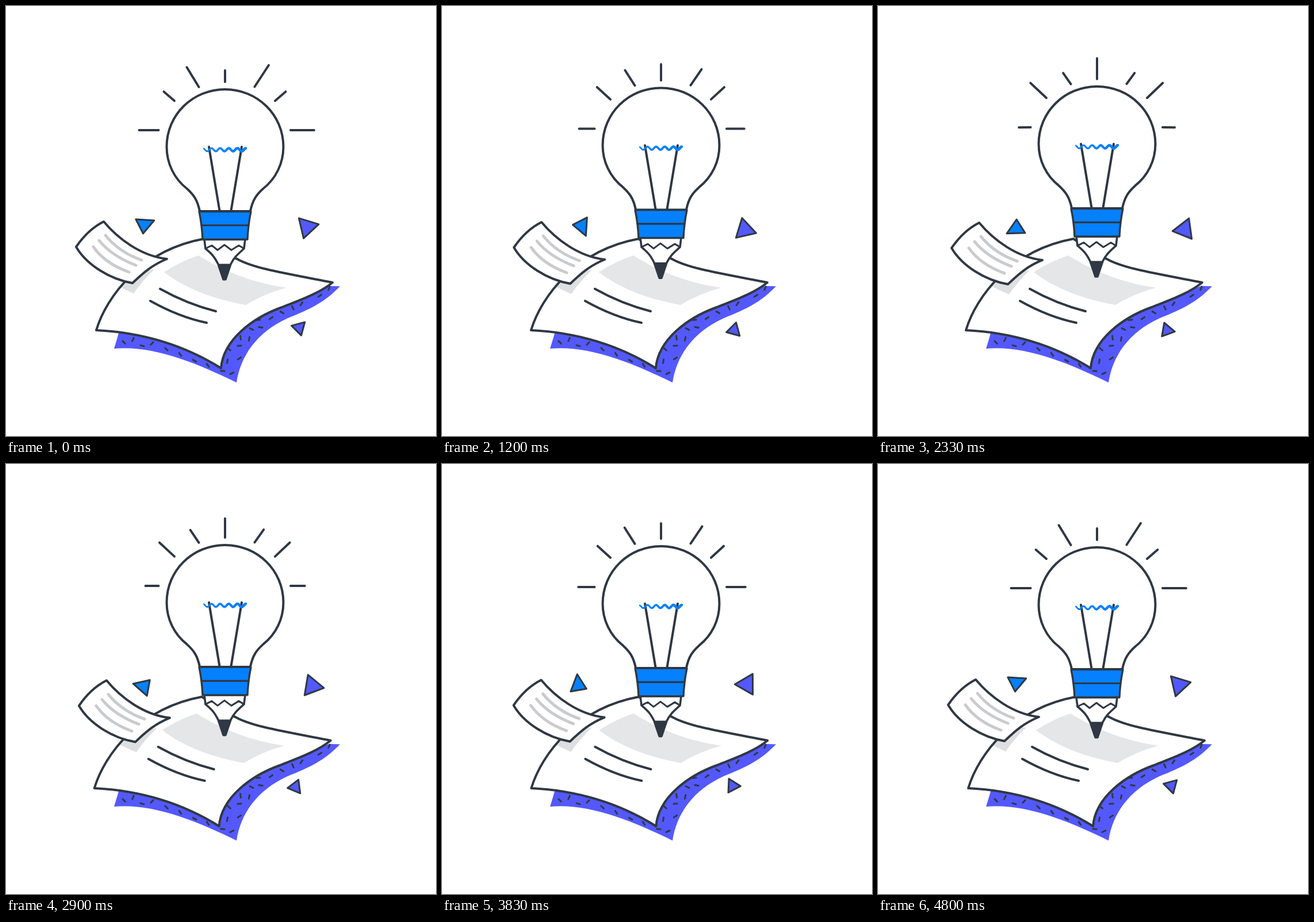
These frames come from a looping animation (748x748 px, 4.83 s). An HTML page with a canvas:

```html
<!DOCTYPE html>
<html lang="en">
<head>
<meta charset="utf-8">
<title>Bright idea</title>
<style>
  html, body { margin: 0; width: 100%; height: 100%; overflow: hidden; background: #fff; }
  canvas { display: block; }
</style>
</head>
<body>
<canvas id="stage" width="748" height="748"></canvas>
<script>
const ctx = document.getElementById('stage').getContext('2d');
const LOOP = 4830, CYCLE = 4800;
const INK = '#2f3843', BLUE = '#0580ff', VIOLET = '#5459ff', PALE = '#e5e6e8', GREY = '#cacbcd', WHITE = '#fff';

const SHADOW = new Path2D('M197 566 L188 596 C255 590 330 620 401 655 C408 610 435 568 490 543 C530 527 555 515 581 487.500 L562 487 L380 560 Z');
const PAPER = new Path2D('M157 564 C175 505 235 425 344 405 C360 415 380 432 402 440 C430 456 480 464 568 481 C545 500 510 512 480 524 C430 542 378 580 374 630 C310 590 240 568 157 564 Z');
const PANEL = new Path2D('M275 463 Q304 444 335 434 C380 462 430 482 488 490 Q450 500 417 520 C360 510 310 490 275 463 Z');
const PAPER_LINES = new Path2D('M268 492 C300 510 330 522 365 531 M251 513 C285 532 315 544 349 551');
const NOTE = new Path2D('M170 375 C195 405 235 435 280 440 C255 450 240 463 220 482 C180 475 140 450 122 419 C135 400 150 385 170 375 Z');
const NOTE_LINES = new Path2D('M173 399 C190 420 210 433 236 442 M162 408 C180 430 205 443 226 451 M152 419 C168 442 192 455 214 463');
const NOTE_SHADE = new Path2D('M185 480 L196 488 L222 500 Q237 478 258 458 L200 465 Z');
const BULB = new Path2D('M337 357 C333 337 326 328 315 318 C292 300 279.500 273 279.500 245 C279.500 189 325 145 381 145 C437 145 482.500 189 482.500 245 C482.500 273 470 300 447 318 C436 328 429 337 425 357 Z');
const WIRES = new Path2D('M353 245 L371.500 356 M410 245 L391.500 356');
const BAND = new Path2D('M336 357.500 L426 357.500 Q421 382 420 406 L342 406 Q341 382 336 357.500 Z');
const BAND_LINE = new Path2D('M340 381.500 L422 381.500');
const PENCIL = new Path2D('M345 406 L347 422 C359 432 363 437 369 449 L378 475 L382 475 L391 449 C397 437 402 433 414 422 L416 406 Z');
const ZIGZAG = new Path2D('M347 422 L358 416.500 L368 424.500 L380 415.500 L392 424.500 L405 416.500 L414 422');
const TIP = new Path2D('M369.500 450 L390.500 450 L382 476 L378 476 Z');

// x, y, angle in degrees
const DASHES = [
  [205, 585, 45], [221, 580, -65], [237, 591, 15], [254, 587, -45], [279, 597, 45], [303, 606, 55],
  [328, 617, 30], [351, 625, 55], [377, 635, 3], [393, 639, -25], [385, 618, -80], [388, 597, 40],
  [406, 613, -32], [406, 591, -3], [408, 577, 82], [423, 579, -78], [427, 562, 25], [443, 559, 8],
  [439, 546, -5], [461, 543, -35], [480, 533, 30], [499, 525, 65], [514, 518, -55], [546, 504, -32], [562, 491, -68]
];

// inner end, outer end at rest, outer end at the top of the rise
const RAYS = [
  [381, 132, 381, 112, 381, 90.3],
  [293, 165, 274.5, 149, 265, 133.5],
  [468, 165, 486.5, 149, 495.5, 133.5],
  [335.5, 141, 314.5, 106.5, 322.3, 117],
  [432.500, 140.500, 457, 103, 446, 117],
  [265.5, 216, 231.5, 216, 245.5, 211],
  [495, 216, 536, 216, 515.5, 211]
];

const equilateral = s => [[-s / 2, -s * 0.2887], [s / 2, -s * 0.2887], [0, s * 0.5774]];
const TIMES = [0, 730, 1670, 2330, 3430, 4230];
const TRIANGLES = [
  { color: BLUE, points: [[-15.4, -8], [16.6, -8], [-1.2, 16]], start: 3.5, turn: 1,
    xs: [240.7, 241, 245, 240.3, 238, 236.3], ys: [380, 381, 384.7, 387.3, 386, 382] },
  { color: VIOLET, points: equilateral(36), start: 17, turn: -1,
    xs: [523.7, 526.7, 527, 533, 531, 528.7], ys: [384.3, 387, 390.3, 388.7, 384, 383] },
  { color: VIOLET, points: equilateral(24), start: -15, turn: 1,
    xs: [510, 507.3, 508.3, 502.7, 505, 506.3], ys: [559.7, 563, 564.3, 564, 560, 560] }
];

const mix = (a, b, k) => a + (b - a) * k;

// Smooth closed curve through values at TIMES
function closedCurve(values, t) {
  const n = TIMES.length;
  const wrap = i => (i + n) % n;
  const time = i => TIMES[wrap(i)] + CYCLE * Math.floor(i / n);
  const value = i => values[wrap(i)];
  const slope = i => (value(i + 1) - value(i - 1)) / (time(i + 1) - time(i - 1));
  let i = n - 1;
  while (i > 0 && TIMES[i] > t) i--;
  const span = time(i + 1) - time(i), u = (t - time(i)) / span, v = 1 - u;
  return v * v * (1 + 2 * u) * value(i) + u * u * (3 - 2 * u) * value(i + 1)
    + span * u * v * (v * slope(i) - u * slope(i + 1));
}

function fill(path, color) {
  ctx.fillStyle = color;
  ctx.fill(path);
}

function stroke(path, width, color = INK) {
  ctx.strokeStyle = color;
  ctx.lineWidth = width;
  ctx.stroke(path);
}

function shifted(dx, dy, draw) {
  ctx.save();
  ctx.translate(dx, dy);
  draw();
  ctx.restore();
}

function line(x1, y1, x2, y2, width, color) {
  const path = new Path2D();
  path.moveTo(x1, y1);
  path.lineTo(x2, y2);
  stroke(path, width, color);
}

function drawShadow() {
  fill(SHADOW, VIOLET);
  for (const [x, y, angle] of DASHES) {
    const a = angle * Math.PI / 180, dx = 3.2 * Math.cos(a), dy = 3.2 * Math.sin(a);
    line(x - dx, y - dy, x + dx, y + dy, 3);
  }
}

function drawPaper(p) {
  shifted(-4.2 * p, 0, () => {
    fill(PAPER, WHITE);
    fill(PANEL, PALE);
    ctx.save();
    ctx.clip(PAPER);
    shifted(10 * p, 1.8 * p, () => fill(NOTE_SHADE, '#dedfe1'));
    ctx.restore();
    stroke(PAPER, 4);
    stroke(PAPER_LINES, 4);
  });
}

function drawNote(p) {
  shifted(6.2 * p, 2 * p, () => {
    fill(NOTE, WHITE);
    stroke(NOTE_LINES, 5, GREY);
    stroke(NOTE, 4);
  });
}

function drawFilament() {
  const y = x => 250 + 2.7 * Math.cos((x - 350) * Math.PI * 2 / 15);
  for (let x = 344; x < 417; x++) line(x, y(x), x + 1, y(x + 1), mix(2.4, 4.6, (x - 344) / 73), BLUE);
}

function drawBulb(p) {
  shifted(0, -5.2 * p, () => {
    fill(PENCIL, WHITE);
    stroke(PENCIL, 3.6);
    stroke(ZIGZAG, 3);
    fill(TIP, INK);
    stroke(TIP, 3);
    fill(BULB, WHITE);
    stroke(BULB, 4);
    stroke(WIRES, 4);
    drawFilament();
    fill(BAND, BLUE);
    stroke(BAND, 3.4);
    stroke(BAND_LINE, 3.2);
  });
}

function drawRays(p) {
  for (const [x, y, x0, y0, x1, y1] of RAYS) line(x, y - 5.2 * p, mix(x0, x1, p), mix(y0, y1, p), 4);
}

function drawTriangle({ color, points, start, turn, xs, ys }, t) {
  const path = new Path2D();
  points.forEach(([x, y]) => path.lineTo(x, y));
  path.closePath();
  shifted(closedCurve(xs, t), closedCurve(ys, t), () => {
    ctx.rotate((start + turn * 360 * t / CYCLE) * Math.PI / 180);
    fill(path, color);
    stroke(path, 3);
  });
}

function render(now) {
  const t = Math.min(now % LOOP, CYCLE);
  const p = 1 - Math.abs(1 - 2 * t / CYCLE);
  ctx.fillStyle = WHITE;
  ctx.fillRect(0, 0, 748, 748);
  ctx.lineCap = ctx.lineJoin = 'round';
  drawShadow();
  drawPaper(p);
  drawNote(p);
  drawRays(p);
  drawBulb(p);
  TRIANGLES.forEach(triangle => drawTriangle(triangle, t));
}

const begin = performance.now();
function tick() {
  render(performance.now() - begin);
  requestAnimationFrame(tick);
}
tick();
</script>
</body>
</html>
```
